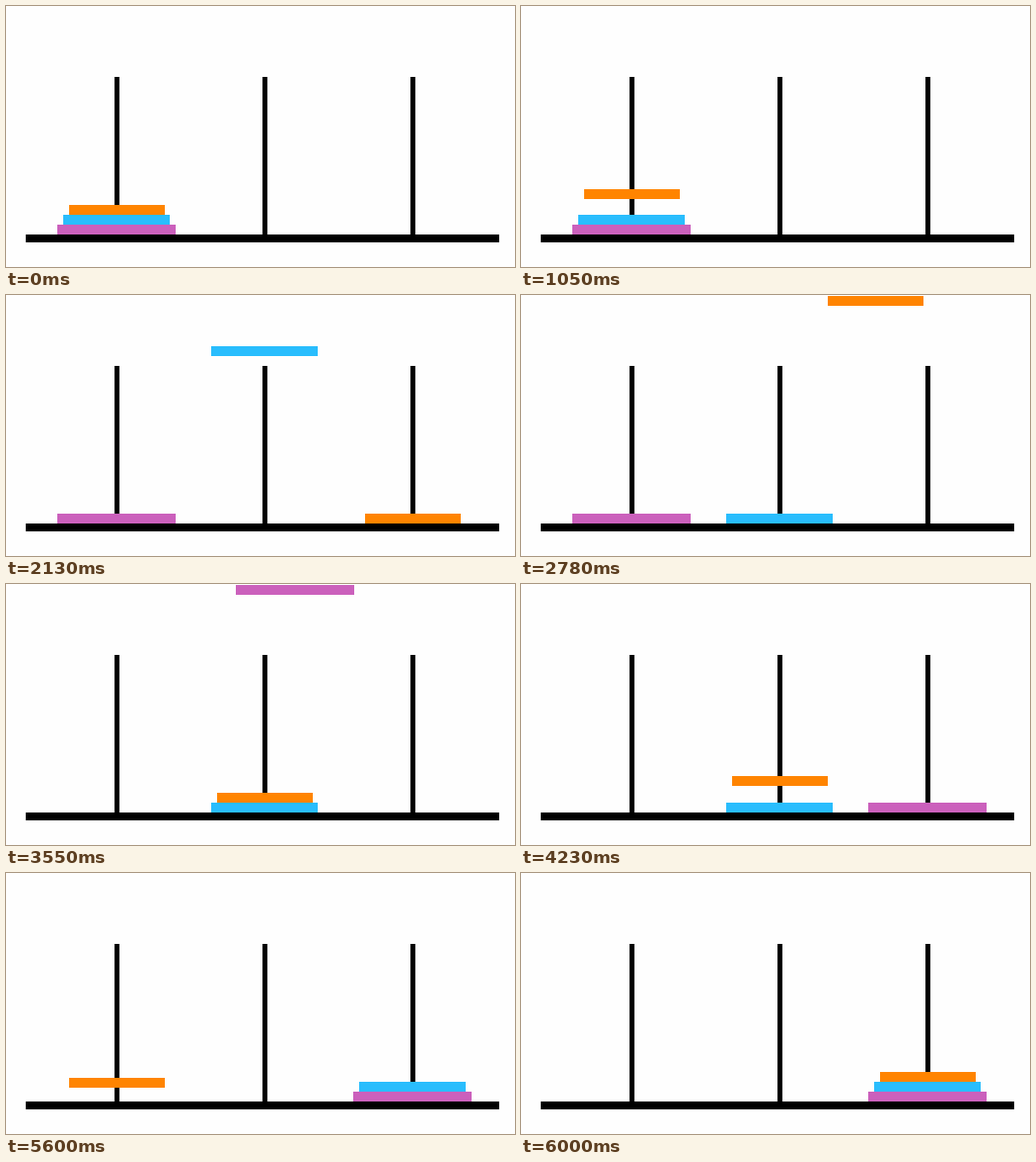
Recreate the animation shown at these times as an HTML page with a canvas. Size 516x265 px, loop 6.96 s.

```html
<!DOCTYPE html>
<html lang="en">
<head>
<meta charset="utf-8">
<title>Tower of Hanoi</title>
<style>
  html, body { margin: 0; width: 100%; height: 100%; overflow: hidden; background: #fefefe; }
  canvas { display: block; }
</style>
</head>
<body>
<canvas id="stage" width="516" height="265"></canvas>
<script>
const ctx = document.getElementById('stage').getContext('2d');
const LOOP = 6960, LEAD = 7;
const GAP = 150, FLOOR = 232, THICK = 10, TOP = 1;

// Largest first; x is the left edge on the first peg.
const discs = [
  { x: 52, width: 120, color: '#cb60bc' },
  { x: 58, width: 108, color: '#29bdfd' },
  { x: 64, width: 97, color: '#ff8400' }
];

// via: [time, distance travelled] where the pace changes
const moves = [
  { from: 0, to: 2, start: 1050, end: 1400 },
  { from: 0, to: 1, start: 1850, end: 2250 },
  { from: 2, to: 1, start: 2650, end: 2950, via: [2780, 272] },
  { from: 0, to: 2, start: 3350, end: 3800, via: [3550, 401] },
  { from: 1, to: 0, start: 4230, end: 4500 },
  { from: 1, to: 2, start: 4930, end: 5200 },
  { from: 0, to: 2, start: 5600, end: 6000 }
];

const levelY = level => FLOOR - THICK * (level + 1);

function travelled(move, total, t) {
  let a = [move.start - LEAD, 0], b = [move.end, total];
  if (move.via) {
    if (t < move.via[0]) b = move.via;
    else a = move.via;
  }
  return a[1] + (b[1] - a[1]) * (t - a[0]) / (b[0] - a[0]);
}

// Position along the path: up, across, down.
function inFlight(disc, move, fromY, toY, t) {
  const rise = fromY - TOP;
  const across = Math.abs(move.to - move.from) * GAP;
  const d = travelled(move, rise + across + toY - TOP, t);
  const side = Math.min(Math.max(d - rise, 0), across);
  return {
    x: disc.x + move.from * GAP + Math.sign(move.to - move.from) * side,
    y: d < rise ? fromY - d : TOP + Math.max(d - rise - across, 0)
  };
}

function drawDisc(disc, x, y) {
  ctx.fillStyle = disc.color;
  ctx.fillRect(Math.round(x), Math.round(y), disc.width, THICK);
}

function draw(t) {
  ctx.fillStyle = '#fefefe';
  ctx.fillRect(0, 0, 516, 265);
  ctx.fillStyle = '#000';
  ctx.fillRect(20, FLOOR, 480, 8);
  for (let peg = 0; peg < 3; peg++) ctx.fillRect(110 + peg * GAP, 72, 5, 160);

  const pegs = [[...discs], [], []];
  let flying = null;
  for (const move of moves) {
    if (t < move.start) break;
    const disc = pegs[move.from].pop();
    if (t < move.end) {
      const fromY = levelY(pegs[move.from].length);
      const toY = levelY(pegs[move.to].length);
      flying = { disc, ...inFlight(disc, move, fromY, toY, t) };
      break;
    }
    pegs[move.to].push(disc);
  }

  pegs.forEach((stack, peg) => stack.forEach((disc, level) =>
    drawDisc(disc, disc.x + peg * GAP, levelY(level))));
  if (flying) drawDisc(flying.disc, flying.x, flying.y);
}

const begin = performance.now();
function frame() {
  draw((performance.now() - begin) % LOOP);
  requestAnimationFrame(frame);
}
frame();
</script>
</body>
</html>
```
